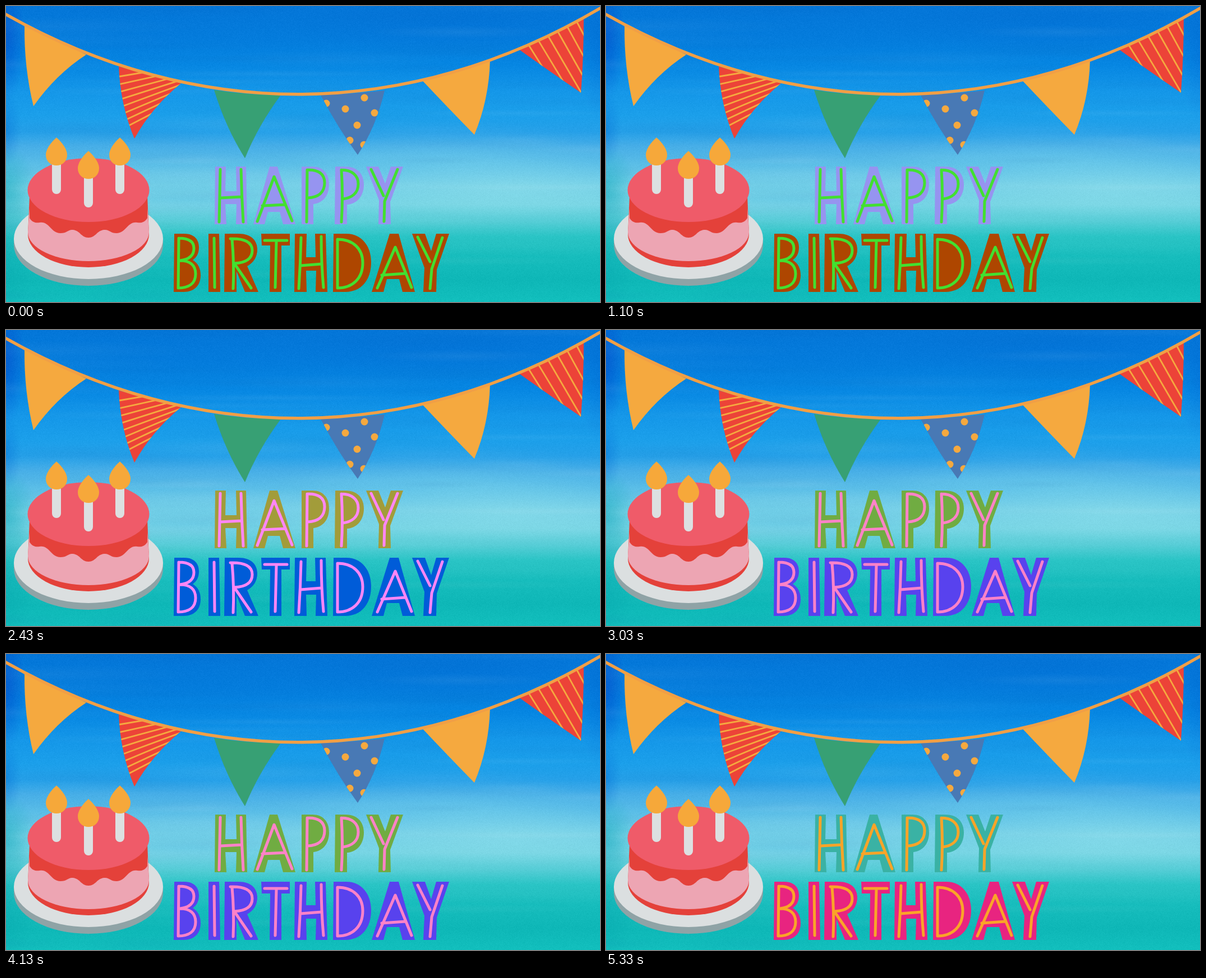
Animation of 1059 by 529 pixels, one loop 5410 ms. Source, as an HTML page with a canvas:

```html
<!DOCTYPE html>
<html lang="en">
<head>
<meta charset="utf-8">
<title>Happy Birthday</title>
<style>
html, body { margin: 0; width: 100%; height: 100%; overflow: hidden; background: #0c84dc; }
canvas { display: block; }
</style>
</head>
<body>
<canvas id="stage" width="1059" height="529" role="img" aria-label="Happy Birthday"></canvas>
<script>
const W = 1059, H = 529, LOOP = 5410, CYCLE = 1100;
const ctx = document.getElementById('stage').getContext('2d');
const scene = document.createElement('canvas');
scene.width = W;
scene.height = H;
const g = scene.getContext('2d');

let seed = 7;
function rand() {
  seed = (seed * 1664525 + 1013904223) >>> 0;
  return seed / 4294967296;
}

function fill(c, path, color) {
  c.fillStyle = color;
  c.fill(typeof path === 'string' ? new Path2D(path) : path);
}

function line(c, path, color, width) {
  c.strokeStyle = color;
  c.lineWidth = width;
  c.stroke(new Path2D(path));
}

function ellipse(x, y, rx, ry, color) {
  g.fillStyle = color;
  g.beginPath();
  g.ellipse(x, y, rx, ry, 0, 0, Math.PI * 2);
  g.fill();
}

// ---------- watercolour sky ----------
function wash(x, y, rx, ry, rgb, alpha) {
  const grad = g.createRadialGradient(0, 0, 0, 0, 0, 1);
  grad.addColorStop(0, `rgba(${rgb},${alpha})`);
  grad.addColorStop(1, `rgba(${rgb},0)`);
  g.save();
  g.translate(x, y);
  g.scale(rx, ry);
  g.fillStyle = grad;
  g.fillRect(-1, -1, 2, 2);
  g.restore();
}

function drawSky() {
  const stops = [
    [0, '#0476d8'], [60, '#047cdc'], [105, '#0686e2'], [150, '#1496e8'],
    [195, '#1b9fea'], [225, '#25a0e8'], [250, '#46ade7'], [285, '#5cbfe7'],
    [320, '#76d0e7'], [355, '#78d5e4'], [385, '#56cdd6'], [412, '#2ac4c5'],
    [450, '#16bcbc'], [490, '#0eb7b7'], [529, '#12bfbd']
  ];
  const grad = g.createLinearGradient(0, 0, 0, H);
  for (const [y, color] of stops) grad.addColorStop(y / H, color);
  g.fillStyle = grad;
  g.fillRect(0, 0, W, H);

  wash(0, 60, 34, 110, '0,66,200', .5);
  wash(0, 220, 28, 70, '0,105,210', .4);
  wash(0, 325, 55, 75, '20,170,190', .6);
  wash(0, 440, 50, 130, '0,150,165', .25);
  wash(800, 30, 330, 50, '0,96,205', .18);
  wash(1059, 90, 35, 120, '0,90,205', .25);
  wash(800, 275, 320, 45, '120,212,236', .4);
  wash(900, 325, 260, 55, '150,228,236', .35);
  wash(330, 345, 300, 45, '80,185,228', .35);

  for (let i = 0; i < 60; i++) {
    const tone = rand() < .5 ? '255,255,255' : '0,70,150';
    wash(rand() * W, rand() * H, 90 + rand() * 200, 6 + rand() * 12, tone, .02 + rand() * .035);
  }

  const img = g.getImageData(0, 0, W, H);
  for (let i = 0; i < img.data.length; i += 4) {
    const n = (rand() - .5) * 8;
    for (let c = 0; c < 3; c++) img.data[i + c] += n;
  }
  g.putImageData(img, 0, 0);
}

// ---------- bunting ----------
const ORANGE = '#f5a93f', RED = '#ec4338';

function flag(path, color, decorate) {
  const shape = new Path2D(path);
  fill(g, shape, color);
  if (!decorate) return;
  g.save();
  g.clip(shape);
  decorate();
  g.restore();
}

function drawBunting() {
  flag('M33 34L143 87Q89 122 49 179Q32 110 33 34Z', ORANGE);
  flag('M201 108L312 138Q259 182 229 237Q204 178 201 108Z', RED, () => {
    for (let i = 0; i < 8; i++) {
      const y = 126 + i * 13.8, slope = .17 + i * .05;
      line(g, `M202 ${y}L320 ${y - 118 * slope}`, ORANGE, 2.8);
    }
  });
  flag('M371 150Q430 159 490 159Q450 213 426 272Q391 216 371 150Z', '#37a074');
  flag('M561 159Q620 157 675 151Q660 216 627 266Q591 217 561 159Z', '#4879b5', () => {
    const dots = [[571, 174], [605, 184], [639, 164], [657, 191], [626, 213], [613, 240], [638, 248]];
    for (const [x, y] of dots) ellipse(x, y, 6.5, 6.5, ORANGE);
  });
  flag('M743 134L863 97Q861 168 835 230Q790 184 743 134Z', ORANGE);
  flag('M915 78L1030 20Q1030 90 1025 155Q971 118 915 78Z', RED, () => {
    for (let i = 0; i < 6; i++) {
      const x = 932 + i * 17, y = 70 - i * 8.6;
      line(g, `M${x} ${y}L${x + 70} ${y + 112 + i * 4}`, ORANGE, 2.8);
    }
  });
  line(g, 'M-2 14C340 207.5 715 207.5 1061 3', '#f19f45', 5.5);
}

// ---------- cake ----------
function candle(x, y) {
  fill(g, `M${x - 8} ${y + 38}H${x + 8}V${y + 93}A8 8 0 0 1 ${x - 8} ${y + 93}Z`, '#dce0e1');
  fill(g, `M${x} ${y}C${x + 8} ${y + 7} ${x + 19} ${y + 20} ${x + 19} ${y + 31}` +
    `C${x + 19} ${y + 43} ${x + 10} ${y + 50} ${x} ${y + 50}` +
    `C${x - 10} ${y + 50} ${x - 19} ${y + 43} ${x - 19} ${y + 31}` +
    `C${x - 19} ${y + 20} ${x - 8} ${y + 7} ${x} ${y}Z`, '#f6a83a');
}

function drawCake() {
  fill(g, 'M14 416V427A133 73 0 0 0 280 427V416Z', '#8fa3a6');
  ellipse(147, 416, 133, 72, '#dbdfe0');
  fill(g, 'M42 340L39 408A108 59 0 0 0 255 408L252 340Z', '#e4413a');
  fill(g, 'M42 360L39 404A108 52 0 0 0 255 404L252 360Z', '#eda5b3');
  fill(g, 'M42 335V379C47 387 53 388 60 387C77 384 79 405 97 406C109 406 111 399 119 400' +
    'C132 401 134 414 147 414C160 414 162 401 175 400C184 399 186 406 197 406' +
    'C215 405 217 384 234 387C241 388 247 387 252 379V335Z', '#e4413a');
  ellipse(147, 329, 108.5, 57, '#ef5b69');
  candle(90, 235);
  candle(203, 235);
  candle(147, 259);
}

// ---------- lettering ----------
const HAPPY = new Path2D([
  'M373 287H392L391 331H411L410 287H428L430 390H410L411 354H391L393 390H372Z',
  'M470 287H484L516 390H494L488 368H467L461 390H441Z',
  'M527 287H546C566 287 576 300 576 319C576 339 565 352 548 354L548 390H527Z',
  'M587 287H606C627 287 638 301 638 319C638 339 626 354 608 355L608 390H586Z',
  'M642 287H664L676 317L686 287H708L685 350L686 390H664L665 347Z'
].join(''));

const BIRTHDAY = new Path2D([
  'M300 407H318C336 407 344 418 344 431C344 442 340 449 333 454C343 460 347 470 347 481C347 499 336 511 317 511H299Z',
  'M361 407H380L382 511H361Z',
  'M390 407H415C437 407 448 419 448 435C448 449 441 459 430 465L450 511H426L411 474L411 511H389Z',
  'M455 407H506V428H491L491 511H470L471 428H456Z',
  'M515 407H536L535 449H552L551 407H570L573 511H552L553 473H535L536 511H514Z',
  'M584 407H607C634 407 651 429 651 458C651 490 633 511 605 511H583Z',
  'M684 407H700L729 511H707L701 488H679L673 511H652Z',
  'M724 407H747L758 438L767 407H790L768 471L767 511H744L746 468Z'
].join(''));

const INLINE = [
  'M382 292L380 386M419 292Q420 340 423 386M382 343L420 341',
  'M448 385L478 305L510 384M457 357L498 355',
  'M537 293L536 386M537 293C557 292 568 300 568 316C568 333 557 342 538 343',
  'M598 293Q601 340 598 386M598 293C617 293 628 303 628 318C628 335 616 343 600 345',
  'M651 292L673 339M698 292L675 349L674 385',
  'M308 415L307 504M308 415C325 415 335 420 335 433C335 446 327 453 310 455C328 455 338 463 338 479C338 496 326 504 307 504',
  'M371 415L372 503',
  'M403 417Q407 460 405 505M400 416C425 415 439 422 439 437C439 452 427 459 407 460L437 504',
  'M461 419H501M482 420L480 503',
  'M526 414Q525 460 522 505M562 412Q562 460 566 503M525 464L563 461',
  'M591 417L591 504M591 417C619 417 636 434 636 459C636 487 618 504 591 504',
  'M662 504L694 431L723 503M670 481L712 478',
  'M734 413L756 457M778 414L759 470L756 505'
].join('');

// Ten hues per turn: top word, bottom word, inline stroke.
const HUES = [
  ['9694f0', 'ae4600', '42e030'], ['c088e8', '506200', '1cde86'],
  ['e77cc3', '007b00', '1fd5ee'], ['f17f8c', '008422', '5fbbff'],
  ['d98b5a', '007b81', 'be9cff'], ['a29c3a', '005cd8', 'ff86f6'],
  ['70ac42', '5842ee', 'ff82c8'], ['49b46d', 'b22cce', 'ff8c70'],
  ['3ab2a4', 'e82480', 'faa428'], ['54a8da', 'e82c24', 'a0c814']
];

// [start within the cycle, hue position]
const STEPS = [
  [0, 0], [70, 1], [100, 2], [130, 3], [170, 4], [230, 5], [300, 6],
  [330, 7], [400, 8], [500, 9], [570, 10], [600, 10.6], [630, 11],
  [670, 12], [730, 14], [770, 15], [830, 16], [900, 17], [930, 18], [1070, 19]
];

function mix(a, b, f) {
  const parts = [0, 2, 4].map(i => {
    const u = parseInt(a.slice(i, i + 2), 16), v = parseInt(b.slice(i, i + 2), 16);
    return Math.round(u + (v - u) * f);
  });
  return `rgb(${parts})`;
}

function colorsAt(t) {
  const phase = t % CYCLE;
  let hue = 0;
  for (const [start, value] of STEPS) if (phase >= start) hue = value;
  const i = Math.floor(hue), next = HUES[(i + 1) % 10];
  return HUES[i % 10].map((c, n) => mix(c, next[n], hue - i));
}

function render(t) {
  const [top, bottom, inline] = colorsAt(t);
  ctx.drawImage(scene, 0, 0);
  fill(ctx, HAPPY, top);
  fill(ctx, BIRTHDAY, bottom);
  ctx.lineCap = ctx.lineJoin = 'round';
  line(ctx, INLINE, inline, 5);
}

drawSky();
drawBunting();
drawCake();

const begin = performance.now();
function tick() {
  render((performance.now() - begin) % LOOP);
  requestAnimationFrame(tick);
}
tick();
</script>
</body>
</html>
```
